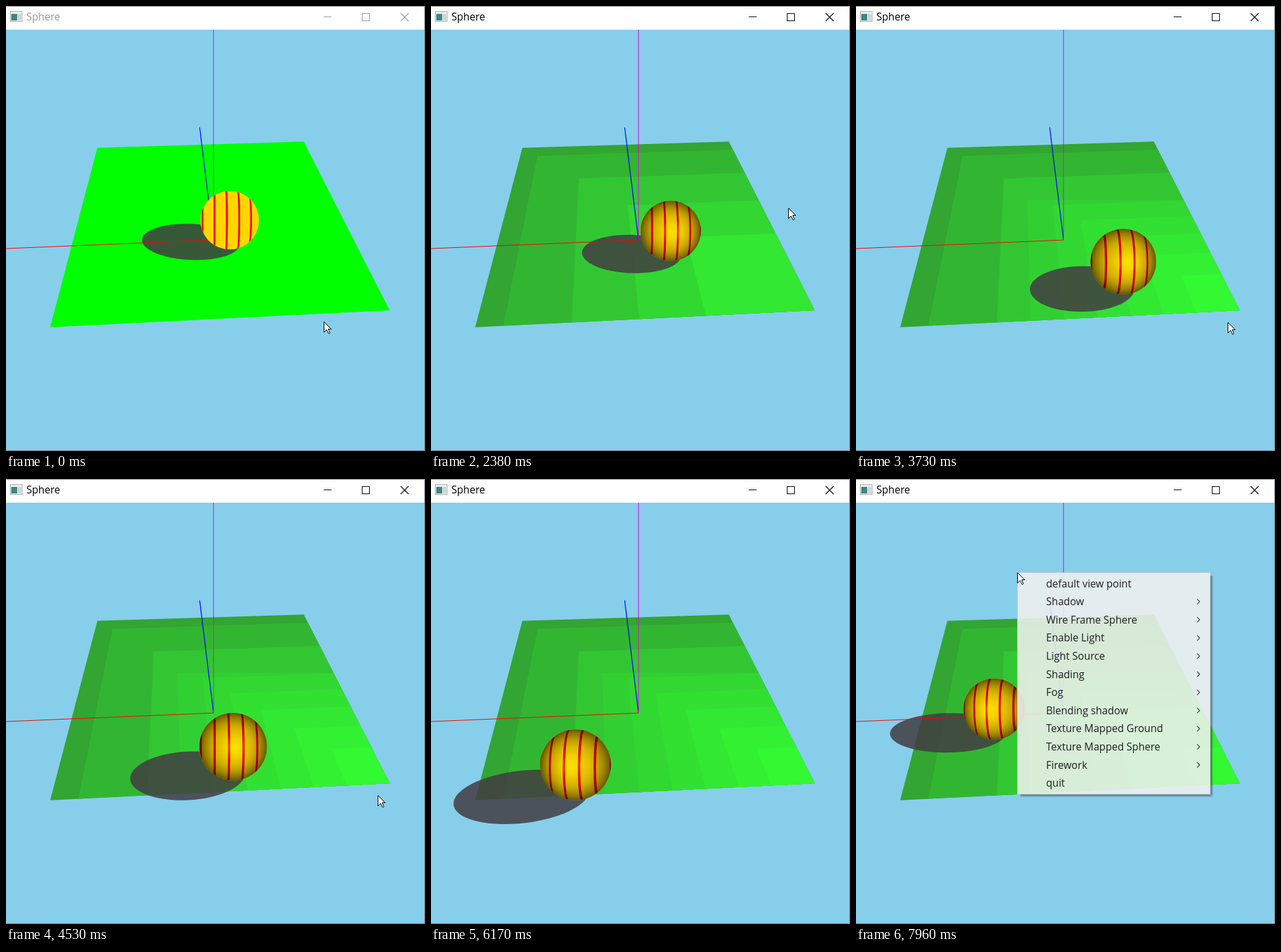
Recreate the animation shown at these times as an HTML page with a canvas. Size 637 px wide and 677 px high, loop 7990 ms.

```html
<!DOCTYPE html>
<html lang="en">
<head>
<meta charset="utf-8">
<title>Sphere</title>
<style>
html, body { margin: 0; width: 100%; height: 100%; overflow: hidden; background: #87ceeb; }
canvas { display: block; }
</style>
</head>
<body>
<canvas id="stage" width="637" height="677"></canvas>
<script>
const g = document.getElementById('stage').getContext('2d');
const LOOP = 7990;
const FONT = '15.6px "Open Sans", "Noto Sans", sans-serif';

// The ball stands still while a menu is open
const MENU_OPEN = 440, MENU_CLOSE = 2340, MENU_AGAIN = 7800;

// Camera looking at the world origin
const EYE = [1.06, 10.6, -14.9], FOCAL = 780, CX = 315.5, CY = 356;
const LAMP = [-14, 12, -3];

const dot = (a, b) => a.reduce((s, v, i) => s + v * b[i], 0);
const cross = (a, b) => [a[1] * b[2] - a[2] * b[1], a[2] * b[0] - a[0] * b[2], a[0] * b[1] - a[1] * b[0]];
const norm = a => { const n = Math.hypot(...a); return a.map(v => v / n); };
const sub = (a, b) => a.map((v, i) => v - b[i]);
const mix = (a, b, k) => a.map((v, i) => v + (b[i] - v) * k);
const clamp = v => Math.min(1, Math.max(0, v));

const FWD = norm(EYE.map(v => -v));
const RIGHT = norm(cross(FWD, [0, 1, 0]));
const UP = cross(RIGHT, FWD);

const toEye = p => { const d = sub(p, EYE); return [dot(d, RIGHT), dot(d, UP), dot(d, FWD)]; };
const toScreen = ([x, y, z]) => [CX + FOCAL * x / z, CY - FOCAL * y / z];
const project = p => toScreen(toEye(p));

// The ball rolls along these corners at constant speed
const PATH = [[-0.534, 1, -0.277], [-2.06, 1, -2.51], [2.03, 1, -4.08], [2.344, 1, -1.02]];
const SPEED = 0.001722;

function ballAt(t) {
  const rolled = Math.min(t, MENU_OPEN) + Math.max(0, Math.min(t, MENU_AGAIN) - MENU_CLOSE);
  let way = rolled * SPEED;
  for (let i = 1; i < PATH.length; i++) {
    const len = Math.hypot(...sub(PATH[i], PATH[i - 1]));
    if (way <= len) return mix(PATH[i - 1], PATH[i], way / len);
    way -= len;
  }
  return PATH[PATH.length - 1];
}

// Pointer moves: from time, to time, place reached
const MOVES = [
  [30, 400, [428, 293]], [840, 1260, [515, 383]], [1880, 2340, [543, 307]],
  [2680, 3400, [565, 481]], [5080, 5330, [468, 485]], [5330, 5990, [370, 590]],
  [7150, 7700, [245, 142]]
];
const pointerAt = t => MOVES.reduce((p, [a, b, end]) => mix(p, end, clamp((t - a) / (b - a))), [483, 480]);

function box(x, y, w, h, color) {
  g.fillStyle = color;
  g.fillRect(x, y, w, h);
}

function trace(points) {
  g.beginPath();
  points.forEach(p => g.lineTo(...p));
}

function fillPoly(points, color) {
  trace(points);
  g.closePath();
  g.fillStyle = color;
  g.fill();
}

function line(points, color, width = 1) {
  trace(points);
  g.strokeStyle = color;
  g.lineWidth = width;
  g.stroke();
}

function floorPatch(x, z, color) {
  fillPoly([[x, 0, z], [-5, 0, z], [-5, 0, -4], [x, 0, -4]].map(project), color);
}

const bandColor = k => `rgb(50,${Math.round(165 + 16.8 * k)},50)`;
const band = k => floorPatch(6.17 - 1.97 * k, 9.42 - 2.34 * k, bandColor(k));

function drawFloor(t) {
  if (t < MENU_CLOSE) return floorPatch(5, 8, '#00ff00');
  floorPatch(5, 8, bandColor(0));
  for (let k = 1; k <= 4; k++) band(k);
  if (t < 2680) return;
  // Finer shading appears where the ball has passed
  g.save();
  g.beginPath();
  g.rect(237, 295, 352, 205);
  g.clip();
  for (let k = 2; k <= 5; k += 0.5) band(k);
  g.restore();
}

function drawShadow(c) {
  const ray = sub(c, LAMP), dist = Math.hypot(...ray), dir = norm(ray);
  const side = norm(cross(dir, [0, 1, 0])), top = cross(side, dir);
  const r = Math.sqrt(1 - 1 / dist ** 2);
  const rim = [];
  for (let i = 0; i < 72; i++) {
    const a = i * Math.PI / 36;
    const p = c.map((v, j) => v - dir[j] / dist + r * (Math.cos(a) * side[j] + Math.sin(a) * top[j]));
    rim.push(project(mix(LAMP, p, LAMP[1] / (LAMP[1] - p[1]))));
  }
  fillPoly(rim, 'rgba(66,61,66,0.85)');
}

function drawAxes() {
  const o = project([0, 0, 0]);
  line([o, project([10, 0, 0])], '#f00', 1.2);
  line([o, project([0, 0, 10.1])], '#00f', 1.2);
  line([o, [o[0], 36]], 'rgba(240,0,240,0.85)', 1.2);
}

// Front edge of the sphere slice at a fixed eye-space x
function slice(x, [cx, cy, cz]) {
  const r = Math.sqrt(Math.max(0, 1 - (x - cx) ** 2));
  const tilt = Math.atan2(cy, cz);
  const points = [];
  for (let i = -12; i <= 12; i++) {
    const a = i / 12 * 1.53 - tilt;
    points.push(toScreen([x, cy + r * Math.sin(a), cz - r * Math.cos(a)]));
  }
  return points;
}

function drawBall(c, lit) {
  const e = toEye(c), [x, y] = toScreen(e);
  const r = FOCAL / Math.sqrt(e[2] ** 2 - 1);
  g.save();
  g.beginPath();
  g.arc(x, y, r, 0, 7);
  g.clip();
  box(x - r, y - r, 2 * r, 2 * r, '#ffd600');
  for (let n = Math.floor((e[0] - 1) / 0.4); n * 0.4 < e[0] + 1; n++) {
    const s = n * 0.4;
    fillPoly([...slice(s, e), ...slice(s + 0.0625, e).reverse()], '#f00');
  }
  if (lit) shade(x, y, r);
  g.restore();
}

function shade(x, y, r) {
  const hx = x + (x - CX) * 0.07, hy = y + 1;
  const dark = g.createRadialGradient(hx, hy, 0, x, y, r);
  for (let p = 0; p <= 1; p += 0.125) dark.addColorStop(p, `rgba(0,0,0,${0.04 + 0.56 * p ** 2.6})`);
  box(x - r, y - r, 2 * r, 2 * r, dark);
  const glow = g.createRadialGradient(hx, hy, 0, hx, hy, r * 0.4);
  glow.addColorStop(0, 'rgba(255,255,0,0.4)');
  glow.addColorStop(1, 'rgba(255,255,0,0)');
  box(x - r, y - r, 2 * r, 2 * r, glow);
}

function text(s, x, y, color) {
  g.font = FONT;
  g.fillStyle = color;
  g.fillText(s, x, y);
}

function drawWindow(active) {
  const ink = active ? '#000' : '#999';
  box(0, 0, 637, 36, '#fff');
  box(0, 0, 637, 1, '#8b8b8b');
  box(636, 0, 1, 677, '#75868d');
  box(0, 676, 637, 1, '#6b7b82');

  box(6, 8, 19, 16, '#a9adb0');
  box(7, 9, 17, 14, '#eef0f1');
  box(8, 12, 9, 10, '#3f8783');
  box(18, 12, 5, 10, '#cfd3d5');
  text('Sphere', 31, 22, ink);

  box(483, 16, 12, 1, ink);
  g.strokeStyle = ink;
  g.lineWidth = 1;
  g.strokeRect(541.5, 11.5, 11, 11);
  line([[600, 11], [612, 23]], ink, 1.1);
  line([[612, 11], [600, 23]], ink, 1.1);
}

const ITEMS = ['default view point', 'Shadow', 'Wire Frame Sphere', 'Enable Light', 'Light Source',
  'Shading', 'Fog', 'Blending shadow', 'Texture Mapped Ground', 'Texture Mapped Sphere', 'Firework', 'quit'];
const ROW = 27.6, MENU_W = 294, MENU_H = 338;

function drawMenu([x, y], fade, hover) {
  g.save();
  g.globalAlpha = fade;
  for (let i = 0; i < 4; i++) {
    const tone = `rgba(0,0,0,${0.45 - i * 0.11})`;
    box(x + MENU_W + i, y + 5, 1, MENU_H - 5 + i, tone);
    box(x + 5, y + MENU_H + i, MENU_W - 5 + i, 1, tone);
  }
  box(x, y, MENU_W, MENU_H, '#f0f0f0');
  g.strokeStyle = '#c8c8c8';
  g.lineWidth = 1;
  g.strokeRect(x + 0.5, y + 0.5, MENU_W - 1, MENU_H - 1);
  if (hover >= 0) box(x + 4, Math.round(y + 3 + hover * ROW), MENU_W - 7, 28, '#91c9f7');
  ITEMS.forEach((item, i) => {
    const mid = y + 17 + i * ROW;
    text(item, x + 44, mid + 5.5, '#000');
    if (i > 0 && i < ITEMS.length - 1) {
      line([[x + 273.5, mid - 4], [x + 277.5, mid], [x + 273.5, mid + 4]], '#222', 1.2);
    }
  });
  g.restore();
}

function outline(points, x, y) {
  const shape = points.map(([px, py]) => [x + px + 0.5, y + py + 0.5]);
  fillPoly(shape, '#fff');
  g.strokeStyle = '#000';
  g.lineWidth = 1;
  g.stroke();
}

const ARROW = [[0, 0], [0, 16], [4, 12], [7, 18], [9, 17], [6.5, 11], [11, 11]];
const HALF = [[0, -12], [4, -7], [1.5, -7], [1.5, 7], [4, 7], [0, 12]];
const RESIZE = [...HALF, ...HALF.slice(1, 5).reverse().map(([x, y]) => [-x, y])];

function drawPointer(t, [x, y]) {
  if (t > 5990 && t < 7150) return;
  outline(t > 5250 && t < 5420 ? RESIZE : ARROW, x, y);
}

function draw(t) {
  const ball = ballAt(t), pointer = pointerAt(t);
  const fade = start => clamp((t - start) / 184);

  box(0, 0, 637, 677, '#87ceeb');
  drawFloor(t);
  drawShadow(ball);
  drawAxes();
  drawBall(ball, t >= MENU_CLOSE);
  drawWindow(t >= 400);

  if (t > MENU_OPEN && t < MENU_CLOSE) {
    const row = Math.floor((Math.min(t, 1260) === t ? pointer[1] - 296 : 87) / ROW);
    drawMenu([428, 293], fade(MENU_OPEN), pointer[0] < 432 ? -1 : row);
  }
  if (t > MENU_AGAIN) drawMenu([245, 142], fade(MENU_AGAIN), -1);
  drawPointer(t, pointer);
}

function tick() {
  draw(performance.now() % LOOP);
  requestAnimationFrame(tick);
}
tick();
</script>
</body>
</html>
```
